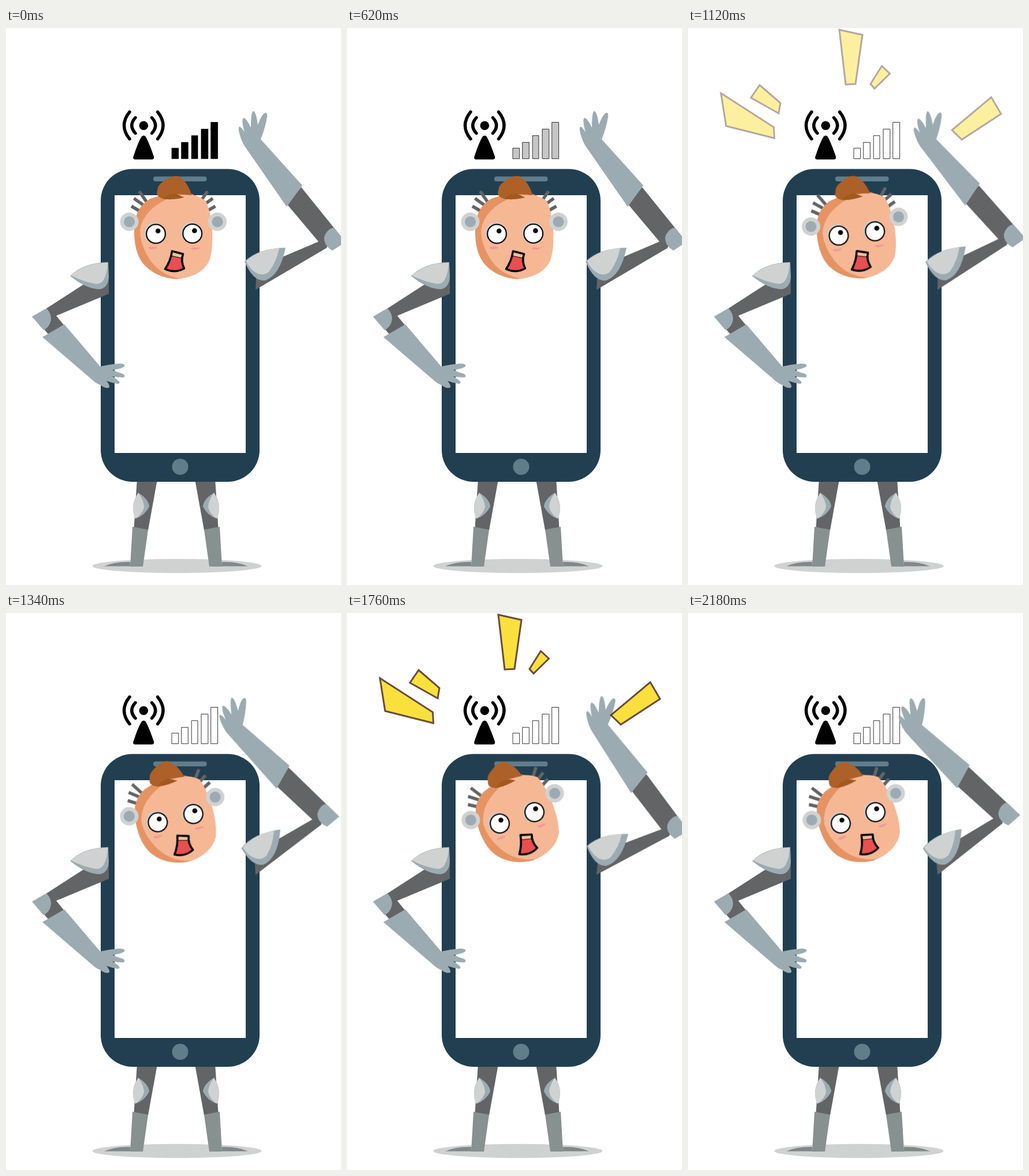
These frames come from a looping animation (580 by 966 pixels, 2.8 s). An HTML page without scripts:

```html
<!DOCTYPE html>
<html lang="en">
<head>
<meta charset="utf-8">
<title>No signal</title>
<style>
  html, body { margin: 0; height: 100%; overflow: hidden; background: #fff; }
  svg { display: block; width: 100%; height: 100%; }

  .navy { fill: #223f51; }
  .dark { fill: #636466; }
  .steel { fill: #9cabb2; }
  .pale { fill: #d0d2d2; }
  .boot { fill: #87918f; }
  .spikes { fill: none; stroke: #636466; stroke-width: 5.5; }
  .waves { fill: none; stroke: #000; stroke-width: 5.4; stroke-linecap: round; }
  .blush { fill: none; stroke: #ee8d98; stroke-width: 1.5; }

  .level, .rays, .head, .arm { animation: 2800ms linear infinite; }
  .level { stroke: #000; stroke-width: .8; animation-name: drain; }
  .rays { fill: #f8d90f; stroke: #46200f; stroke-width: 3; opacity: 0; animation-name: flash; }
  .head { transform-origin: 288px 345px; animation-name: tilt; }
  .arm { transform-origin: 433px 453px; animation-name: wave; }

  @keyframes drain {
    0% { fill-opacity: 1; }
    28.571%, 100% { fill-opacity: 0; }
  }
  @keyframes flash {
    0%, 28.571%, 42.857%, 57.143%, 71.429%, 100% { opacity: 0; }
    35.714%, 64.286% { opacity: 1; }
  }
  @keyframes tilt {
    0%, 32.143% { transform: rotate(0deg); }
    54.286%, 100% { transform: rotate(-17.7deg); }
  }
  @keyframes wave {
    0%, 35.714% { transform: rotate(0deg); }
    50% { transform: rotate(-8.1deg); }
    64.286% { transform: rotate(3.5deg); }
    77.857%, 100% { transform: rotate(-7.9deg); }
  }
</style>
</head>
<body>
<svg viewBox="0 0 580 966">
  <defs>
    <g id="leg">
      <path class="dark" d="M227 780H262.500L246 871L221.500 868Z"/>
      <path class="steel" d="M229 806Q247 817 248 830Q240 846 224 851Q214 828 229 806Z"/>
      <path class="pale" d="M229 806Q239 820 239 831Q236 843 224 851Q214 830 229 806Z"/>
      <path class="boot" d="M219 865L246 870L237 934H215Z"/>
      <path fill="#7f8988" d="M170 933.500Q188 925 215 926V933.500Z"/>
    </g>
    <path id="spikes" class="spikes" d="M230.500 283L244 302.500M221.500 295.500L239 308M217 309L232.500 318"/>
    <g id="ear">
      <circle class="pale" cx="213.500" cy="336" r="16"/>
      <circle class="steel" cx="213.500" cy="336" r="9.500"/>
    </g>
    <g id="eye">
      <circle cx="-2" cy="-2" r="18" fill="#cfcac8"/>
      <circle r="16.400" fill="#fff" stroke="#111" stroke-width="2.300"/>
      <circle cx="3.700" cy="-5" r="4.300"/>
    </g>
    <path id="arcs" class="waves" d="M214 145.500Q195 169 214 192.500M224 155.500Q211.500 169 224 182.500"/>
    <path id="blush" class="blush" d="M0 1L3-1L4 2L7-1L8 2L11-1L12 1L15-1"/>
    <path id="lips" d="M287.500 387L306.500 392Q302 404 308.500 417Q292 426 275.500 418Q285 404 287.500 387Z"/>
  </defs>

  <!-- legs -->
  <ellipse class="pale" cx="296" cy="933" rx="146.500" ry="12.300"/>
  <use href="#leg"/>
  <use href="#leg" transform="matrix(-1 0 0 1 589 0)"/>

  <!-- phone -->
  <rect class="navy" x="164" y="244.500" width="275" height="542.400" rx="55"/>
  <rect x="188" y="290" width="227" height="447" fill="#fff"/>
  <rect x="255" y="257.500" width="92.500" height="8.500" rx="4" fill="#607d8b"/>
  <circle cx="301.500" cy="761" r="14" fill="#607d8b"/>

  <!-- signal -->
  <use href="#arcs"/>
  <use href="#arcs" transform="matrix(-1 0 0 1 476.500 0)"/>
  <circle cx="238.300" cy="169.300" r="7.800"/>
  <path d="M235 188Q238.300 185 241.500 188Q247 197 256 223Q257 228 252 228H224Q219 228 220.500 223Q229 197 235 188Z"/>
  <path class="level" d="M287 208.300H298.700V226.700H287ZM303.700 198.300H315.300V226.700H303.700ZM321.200 186.700H332V226.700H321.200ZM338 175.300H349.800V226.700H338ZM354.700 163.500H366.600V226.700H354.700Z"/>

  <!-- head -->
  <g class="head">
    <use href="#spikes"/>
    <use href="#spikes" transform="matrix(-1 0 0 1 579.500 0)"/>
    <path fill="#e69364" d="M222 358Q220 312 250 296Q285 283 322 288Q350 298 355 335Q360 375 352 403Q339 430 295 435.500Q258 433 237 408Q223 390 222 358Z"/>
    <path fill="#f6b795" d="M232 350Q238 312 290 292Q325 283 346 300Q355 320 357 350Q359 385 351 405Q339 429 302 435Q264 428 246 397Q232 374 232 350Z"/>
    <use href="#ear"/>
    <use href="#ear" transform="matrix(-1 0 0 1 579.500 0)"/>
    <path fill="#ad6028" d="M262 282Q262 272 274 265Q286 255 298 257Q314 265 321.500 290L296 288L308 294Q288 299 271 296Q258 291 262 282Z"/>
    <path fill="#a2581f" d="M271 296Q280 288 293 287L308 294Q288 299 271 296Z"/>
    <use href="#eye" x="259.500" y="357"/>
    <use href="#eye" x="322.700" y="356.500"/>
    <use href="#blush" x="247" y="381"/>
    <use href="#blush" x="320" y="382"/>
    <use href="#lips" fill="#e94f50"/>
    <path fill="#f3c190" stroke="#000" d="M287.500 387L306.500 392L304 399L285.500 395Z"/>
    <use href="#lips" fill="none" stroke="#000" stroke-width="3.600" stroke-linejoin="round"/>
  </g>

  <!-- resting arm -->
  <path class="dark" d="M178 461L87 499L100 515L74 532L62 518L69 487L137 443L178 428Z"/>
  <path class="steel" d="M45 500.500L70 486Q80 497 77.500 508Q75 519 65 524Z"/>
  <path class="steel" d="M63 536L101 514L163 587Q180 583 196 582Q206 582 205.500 586Q202 591 184 593Q193 597 203 600Q208 604 203 606Q193 606 184 604Q193 610 196 613Q198 617 193 617Q182 615 174 612Q180 619 179 623Q174 627 163 619Q155 616 148 609Z"/>
  <path class="steel" d="M111 430Q134 407 177 406L178 431Q177 450 163 453Q139 453 111 430Z"/>
  <path class="pale" d="M112 429Q138 407 176 407Q176 423 169 437Q163 446 152 443Q134 440 112 429Z"/>

  <!-- waving arm -->
  <g class="arm">
    <path class="dark" d="M432 454L434 416L541 370.500L486 305L511 276L569 348L555 381.500Z"/>
    <path class="steel" d="M568 346L588 371L565 386Q549 376 551 362Q556 348 568 346Z"/>
    <path class="steel" d="M441 193L513 273L486 310L416 209Q409 200 405 186Q401 173 404 171Q408 172 413 181Q407 159 411 156Q416 156 424 173Q424 145 428 144Q433 145 436 168Q443 149 449 147Q453 147 452 154Q449 173 441 193Z"/>
    <path class="steel" d="M413 405Q436 382 484 381Q474 430 448 438Q428 440 413 405Z"/>
    <path class="pale" d="M415.500 404Q440 383 473 382Q468 406 455 423Q446 430 436 426Q423 420 415.500 404Z"/>
  </g>

  <!-- rays -->
  <path class="rays" d="M262 3L302 12L290 97L273 98ZM335.500 66L349.500 79L323 105L316 97ZM525 120L542 149L474 193.500L457 177ZM57 113L148.500 172L149.500 191L66 170ZM124 99L160 130L157 148L109 121Z"/>
</svg>
</body>
</html>
```
